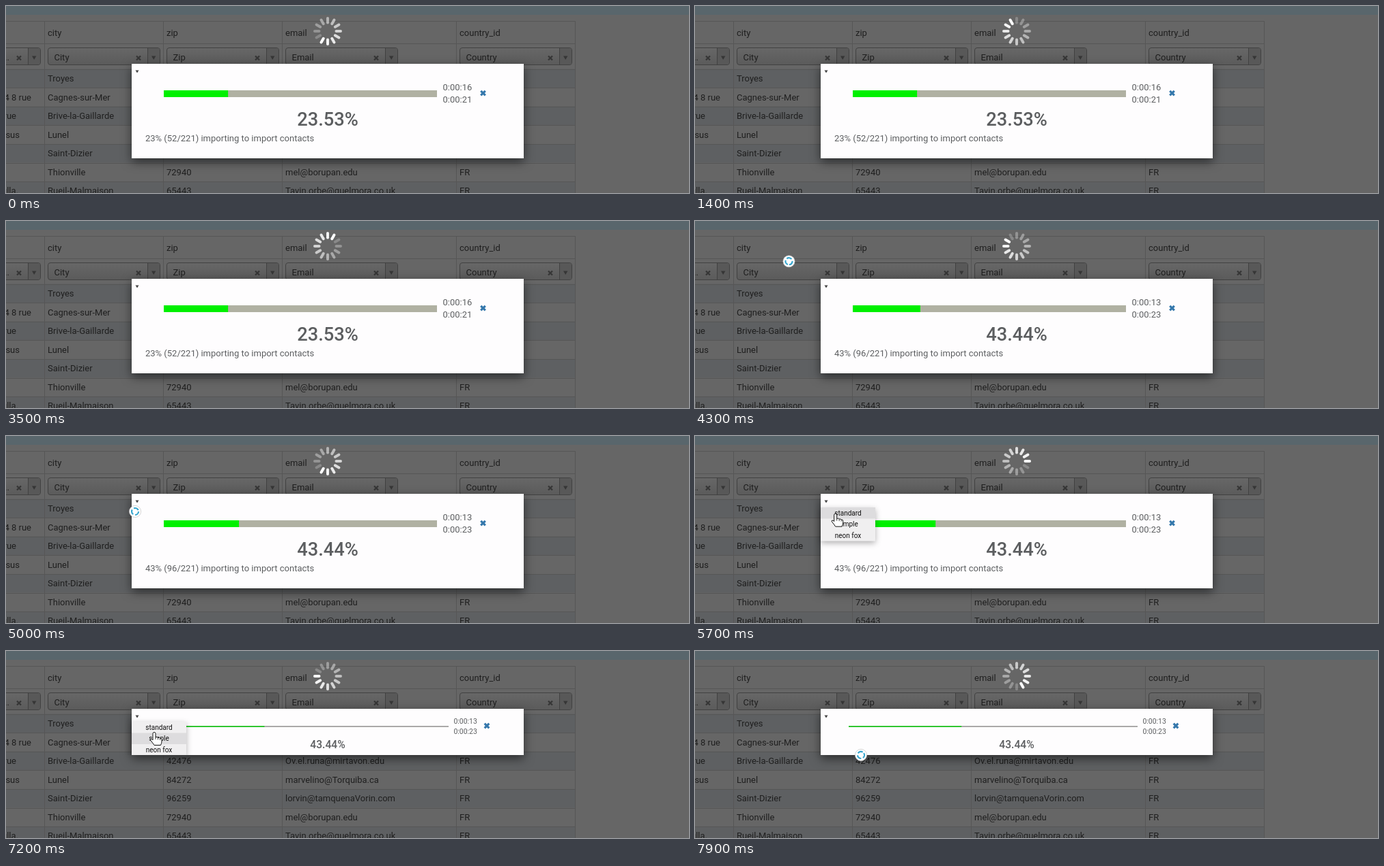
An HTML page that plays this animation: 1000 by 275 pixels, repeating every 8000 ms.

```html
<!DOCTYPE html>
<html lang="en">
<head>
<meta charset="utf-8">
<title>Import progress</title>
<style>
  html, body { margin: 0; width: 100%; height: 100%; overflow: hidden; background: #666; }
  svg { display: block; width: 1000px; height: 275px; font: 13px Roboto, sans-serif; }
  .page { fill: #1f1f1f; }
  .line { stroke: #565656; }
  .mark { stroke: #363636; stroke-width: 2.3; }
  .sheet { fill: #fefdfe; filter: drop-shadow(0 5px 7.5px rgba(0, 0, 0, .55)); }
  .info { fill: #5c5e60; }
  .small { font-size: 10.4px; }
  .pct { font-size: 27.3px; font-weight: 500; text-anchor: middle; }
  .small.pct { font-size: 15.6px; }
  .close { stroke: #3578ac; stroke-width: 3.2; }
  .menu { font-size: 10px; text-anchor: middle; fill: #111; }
  .menu .bg { fill: #f0eff0; filter: drop-shadow(0 3px 4px rgba(0, 0, 0, .3)); }
</style>
</head>
<body>
<svg viewBox="0 0 1000 275">
  <defs>
    <linearGradient id="btn" x2="0" y2="1">
      <stop stop-color="#676767"/><stop offset="1" stop-color="#5b5b5b"/>
    </linearGradient>
    <clipPath id="clip"><rect x="170" y="80" width="120" height="100" id="clipBox"/></clipPath>
  </defs>
  <rect width="1000" height="275" fill="#666"/>
  <rect width="1000" height="13" fill="#59666c"/>
  <g id="page" class="page"></g>
  <g id="spinner" fill="#fff"></g>

  <rect id="sheet" class="sheet" x="184" y="85" width="574" height="139"/>
  <path d="M189.5 94.5h5l-2.5 4z" fill="#444"/>

  <g id="standard" class="info">
    <rect x="231" y="124" width="400" height="10" fill="#b0b1a2"/>
    <rect id="bar" x="231" y="124" height="10" fill="#00f000"/>
    <text id="left" x="639.5" y="124"></text>
    <text id="total" x="639.5" y="142"></text>
    <path class="close" d="M695.2 124.8l6.6 6.6m0-6.6l-6.6 6.6"/>
    <text id="pct" class="pct" x="471" y="175.5"></text>
    <text id="status" x="204" y="199"></text>
  </g>

  <g id="simple" class="info small">
    <rect x="225" y="110" width="423" height="2" fill="#aaa9a8"/>
    <rect id="thinBar" x="225" y="110" height="2" fill="#2fc52f"/>
    <text x="655.5" y="107">0:00:13</text>
    <text x="655.5" y="122">0:00:23</text>
    <path class="close" d="M700.7 106.7l6.6 6.6m0-6.6l-6.6 6.6"/>
    <text class="small pct" x="471" y="143">43.44%</text>
  </g>

  <g id="menuClip">
    <g id="menu" class="menu">
      <rect class="bg" x="184" y="104" width="80" height="49.5"/>
      <rect id="hover" x="184" width="80" height="16.5" fill="#dddcde"/>
      <text x="224" y="116">standard</text>
      <text x="224" y="132">simple</text>
      <text x="224" y="149">neon fox</text>
    </g>
  </g>

  <g id="busy">
    <circle r="8.6" fill="#fff" stroke="#bbb" stroke-width=".6"/>
    <circle id="swirl" r="5" fill="none" stroke="#36a6cf" stroke-width="2.2" stroke-dasharray="7.6 2.9"/>
  </g>
  <g id="hand" fill="#fff" stroke="#111" stroke-linejoin="round">
    <path d="M-2 11V1.5Q-2-.5 0-.5T2 1.5V7Q4 5.5 5.5 7.5Q7.5 6.5 8.5 8.5Q11 7.5 11 10.5V13Q11 15 9.5 18.5H0Q-1.5 16-5.5 11Q-5.5 8.5-3.5 9.5Z"/>
    <path d="M2 7v3M5.5 7.5v3M8.5 8.5v2.5" stroke-width=".8"/>
  </g>
</svg>
<script>
const $ = id => document.getElementById(id);
const add = (parent, tag, attrs, text = '') => {
  const el = document.createElementNS('http://www.w3.org/2000/svg', tag);
  for (const k in attrs) el.setAttribute(k, attrs[k]);
  el.textContent = text;
  return parent.appendChild(el);
};
const set = (id, attr, value) => $(id).setAttribute(attr, value);
const show = (id, on) => set(id, 'display', on ? 'inline' : 'none');

// Table behind the overlay
const page = $('page');
const label = (x, y, text, anchor = 'start') => add(page, 'text', { x, y, 'text-anchor': anchor }, text);
const rows = [
  ['', 'Troyes'],
  ['4 8 rue', 'Cagnes-sur-Mer', 37],
  ['rue', 'Brive-la-Gaillarde', 15, '42476', 'Ov.el.runa@mirtavon.edu'],
  ['sus', 'Lunel', 20, '84272', 'marvelino@Torquiba.ca'],
  ['', 'Saint-Dizier', 0, '96259', 'lorvin@tamquenaVorin.com'],
  ['', 'Thionville', 0, '72940', 'mel@borupan.edu'],
  ['ulla.', 'Rueil-Malmaison', 18, '65443', 'Tavin.orbe@quelmora.co.uk']
];
rows.forEach(([street, city, end, zip = '', mail = ''], i) => {
  const top = 92.5 + 27.6 * i, base = Math.round(111 + 27.55 * i);
  if (i % 2 === 0) add(page, 'rect', { x: 0, y: top, width: 833, height: 27.6, fill: '#5e6062' });
  add(page, 'path', { class: 'line', d: `M0 ${Math.round(top) + .5}H833` });
  label(end || 0, base, street, 'end');
  label(61, base, city);
  label(235, base, zip);
  label(409, base, mail);
  label(664, base, 'FR');
});
add(page, 'path', { class: 'line', fill: 'none', d: 'M0 22.5H833.5V275M0 55.5H833M56.5 22V275M230.5 22V275M404.5 22V275M659.5 22V275' });

const combo = (x, text) => {
  add(page, 'rect', { x: x + .5, y: 61.5, width: 164, height: 25, rx: 3.5, fill: 'url(#btn)', stroke: '#414141' });
  add(page, 'path', { d: `M${x + 146.5} 62h14.5q3 0 3 3v18q0 3-3 3h-14.5z`, fill: '#585858' });
  add(page, 'path', { d: `M${x + 146.5} 62v24`, stroke: '#414141' });
  add(page, 'path', { class: 'mark', d: `M${x + 130} 73.5l6 6m0-6l-6 6` });
  add(page, 'path', { d: `M${x + 152} 73.5h6.4l-3.2 5.5z`, fill: '#363636' });
  label(x + 9.5, 80, text);
};
combo(-114, '');
label(5, 80, '...', 'end');
[[61, 'city', 'City'], [235, 'zip', 'Zip'], [409, 'email', 'Email'], [664, 'country_id', 'Country']]
  .forEach(([x, name, value]) => { label(x, 44, name); combo(x, value); });

for (let k = 0; k < 12; k++) {
  add($('spinner'), 'rect', {
    x: -2, y: -21, width: 4, height: 10.5, rx: 2,
    opacity: 1 - k * .07, transform: `rotate(${210 - 30 * k})`
  });
}

// Pointer stops: time, x, y
const busyIn = [[3600, 98, 0], [3800, 98, 5], [4000, 100, 12], [4400, 150, 75], [4800, 186, 113], [5000, 189, 111]];
const handPath = [[5200, 192, 98], [5500, 193, 100], [5800, 212, 122], [6000, 215, 130], [6300, 200, 103], [6500, 215, 122], [6600, 217, 120]];
const busyOut = [[7400, 222, 128], [7700, 238, 148], [7900, 243, 153]];
const along = (path, t) => {
  const i = path.findIndex(p => p[0] > t);
  if (i < 0) return path[path.length - 1].slice(1);
  const [a, b] = [path[Math.max(0, i - 1)], path[i]];
  const f = i ? (t - a[0]) / (b[0] - a[0]) : 0;
  return [1, 2].map(n => a[n] + (b[n] - a[n]) * f);
};

const holds = [4, 9, 24, 34, 39, 51, 54, 67, 69, 71];
let last = -1;

function draw(t) {
  const turn = Math.floor(t % 1000 * 12 / 1000) * 30;
  set('spinner', 'transform', `translate(471 37) rotate(${turn})`);

  const updated = t >= 4000, slim = t >= 7200;
  const part = .2353 + .1991 * Math.max(0, t - 4000) / 5000;
  set('bar', 'width', 400 * part);
  set('thinBar', 'width', 423 * part);
  set('sheet', 'height', slim ? 68 : 139);
  show('standard', !slim);
  show('simple', slim);
  $('left').textContent = updated ? '0:00:13' : '0:00:16';
  $('total').textContent = updated ? '0:00:23' : '0:00:21';
  $('pct').textContent = updated ? '43.44%' : '23.53%';
  $('status').textContent = (updated ? '43% (96/221)' : '23% (52/221)') + ' importing to import contacts';

  const open = t >= 5200 && t < 7400;
  const away = t >= 3600 && !open;
  const [x, y] = along(open ? handPath : t < 5200 ? busyIn : busyOut, t);
  const item = Math.floor((y - 102.5) / 16.5);
  show('menu', open);
  show('hover', item >= 0);
  set('hover', 'y', 104 + 16.5 * item);
  set('menu', 'transform', `translate(0 ${slim ? 0 : 1})`);
  set('clipBox', 'height', slim ? 73 : 100);
  set('menuClip', 'clip-path', 'url(#clip)');
  show('hand', open);
  show('busy', away);
  set(open ? 'hand' : 'busy', 'transform', `translate(${x} ${y})`);
  set('swirl', 'transform', `rotate(${t * .36})`);
}

function frame(now) {
  let tick = Math.floor(now % 8000 / 100);
  if (holds.includes(tick)) tick--;
  if (tick !== last) draw((last = tick) * 100);
  requestAnimationFrame(frame);
}
draw(0);
const start = performance.now();
requestAnimationFrame(function loop(now) {
  frame.call(null, Math.max(0, now - start));
});
</script>
</body>
</html>
```
